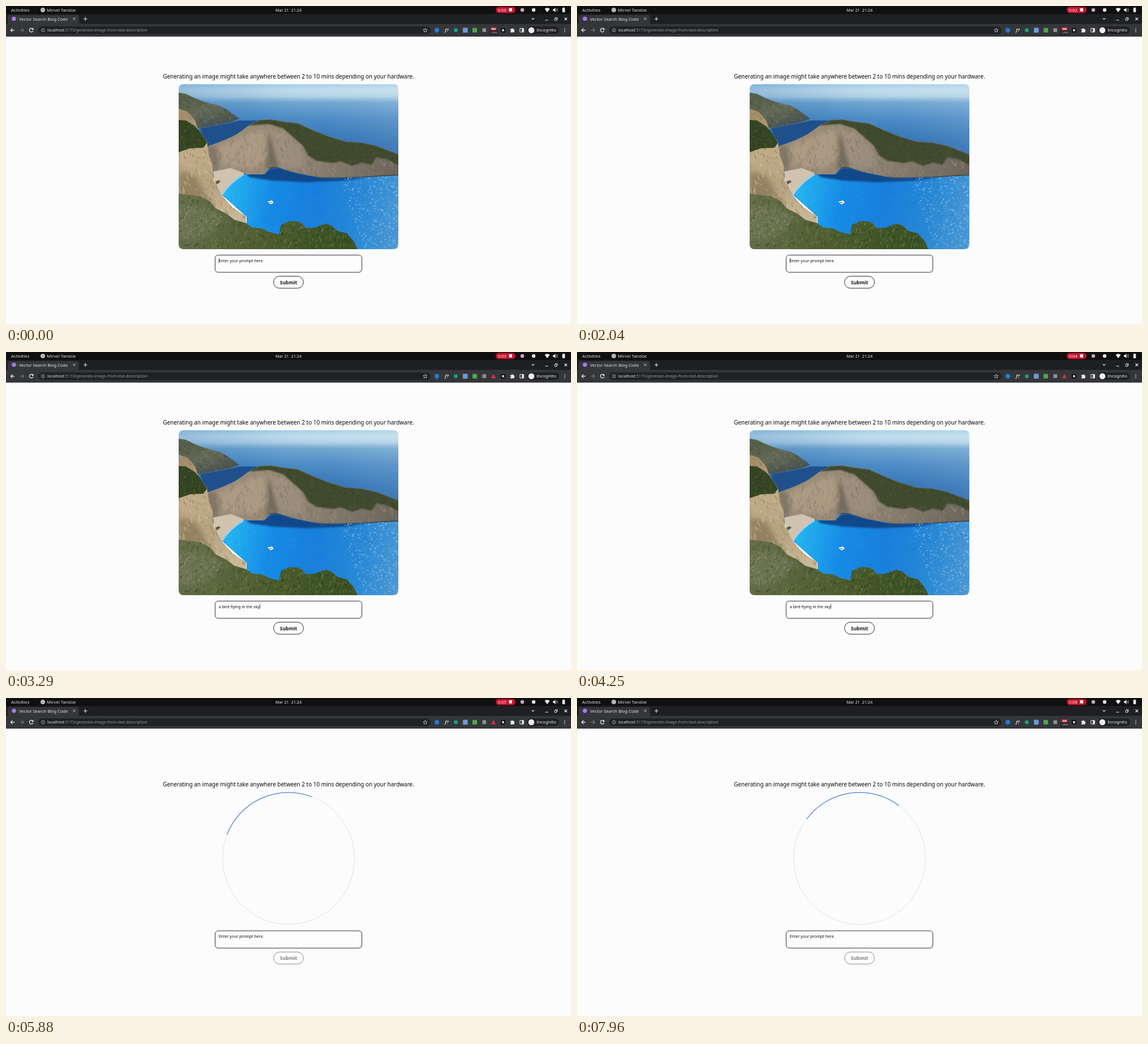
Write an HTML page with a canvas that moves like this. It is 998x561 px and loops after 8 s.

```html
<!DOCTYPE html>
<html lang="en">
<head>
<meta charset="utf-8">
<title>Image generator</title>
<style>
html, body { margin: 0; width: 100%; height: 100%; overflow: hidden; background: #fcfcfd; }
canvas { display: block; width: 998px; height: 561px; }
</style>
</head>
<body>
<canvas id="stage" width="998" height="561"></canvas>
<script>
const W = 998, H = 561, LOOP = 8000;
const TYPE_FROM = 2150, TYPE_STEP = 45, SUBMIT_AT = 4930;
const PROMPT = 'a bird flying in the sky';
const FONT = '"Noto Sans", "Open Sans", sans-serif';
// [time, turned degrees] of the spinner
const SPIN = [[4960, 5], [6790, 662.6], [7960, 1071.3]];

let ctx = document.getElementById('stage').getContext('2d');

function makeLayer(draw) {
  const layer = document.createElement('canvas');
  layer.width = W;
  layer.height = H;
  const main = ctx;
  ctx = layer.getContext('2d');
  draw();
  ctx = main;
  return layer;
}

function text(str, x, midY, size, color, align = 'left', weight = 400) {
  ctx.font = `${weight} ${size}px ${FONT}`;
  ctx.textAlign = align;
  ctx.fillStyle = color;
  ctx.fillText(str, x, midY + size * 0.36);
  return ctx.measureText(str).width;
}

function rect(x, y, w, h, color) {
  ctx.fillStyle = color;
  ctx.fillRect(x, y, w, h);
}

function round(x, y, w, h, r, fill, stroke, line = 1) {
  ctx.beginPath();
  ctx.roundRect(x, y, w, h, r);
  paint(fill, stroke, line);
}

function dot(x, y, r, fill, stroke, line = 1) {
  ctx.beginPath();
  ctx.arc(x, y, r, 0, Math.PI * 2);
  paint(fill, stroke, line);
}

function paint(fill, stroke, line) {
  if (fill) { ctx.fillStyle = fill; ctx.fill(); }
  if (stroke) { ctx.strokeStyle = stroke; ctx.lineWidth = line; ctx.stroke(); }
}

function fill(d, color) {
  ctx.fillStyle = color;
  ctx.fill(new Path2D(d));
}

function stroke(d, color, line = 1) {
  ctx.strokeStyle = color;
  ctx.lineWidth = line;
  ctx.stroke(new Path2D(d));
}

function gradient(x0, y0, x1, y1, ...colors) {
  const g = ctx.createLinearGradient(x0, y0, x1, y1);
  colors.forEach((c, i) => g.addColorStop(i / (colors.length - 1), c));
  return g;
}

function randomizer(seed) {
  return () => (seed = (seed * 16807) % 2147483647) / 2147483647;
}

// Short seeded strokes inside a shape
function texture(d, [x, y, w, h], count, colors, len, slope, seed) {
  const rnd = randomizer(seed);
  ctx.save();
  ctx.clip(new Path2D(d));
  ctx.lineCap = 'round';
  for (let i = 0; i < count; i++) {
    const px = x + rnd() * w, py = y + rnd() * h;
    const a = slope + (rnd() - 0.5) * 1.3, l = len * (0.4 + rnd());
    ctx.beginPath();
    ctx.moveTo(px, py);
    ctx.lineTo(px + Math.cos(a) * l, py + Math.sin(a) * l);
    ctx.strokeStyle = colors[Math.floor(rnd() * colors.length)];
    ctx.lineWidth = 0.7 + rnd() * 1.3;
    ctx.stroke();
  }
  ctx.restore();
}

// A shape with a blurred edge, kept inside another shape
function shade(clip, d, color, blur) {
  ctx.save();
  ctx.clip(new Path2D(clip));
  ctx.filter = `blur(${blur}px)`;
  fill(d, color);
  ctx.restore();
}

function drawPhoto() {
  ctx.beginPath();
  ctx.roundRect(305, 138, 388, 291, 8);
  ctx.clip();

  rect(305, 138, 388, 32, gradient(305, 138, 305, 170, '#a6cfe8', '#c0deec', '#b0d0e5', '#6ea5d0'));
  rect(305, 169, 388, 134, gradient(305, 169, 305, 262, '#6ea5d0', '#4787c2', '#3174b5', '#2563a9'));
  rect(305, 138, 388, 130, gradient(305, 0, 693, 0, '#1e62a840', '#1e62a818', '#ffffff08', '#ffffff20'));

  const cape = 'M305 153L318 155L330 161L345 167L360 172L378 176L392 184L412 199L396 205L345 215L305 215Z';
  fill(cape, gradient(340, 155, 360, 215, '#535e48', '#666a58', '#465351'));
  texture(cape, [305, 150, 110, 66], 240, ['#3c4c3088', '#85806c77', '#50594588'], 4, 0.7, 23);
  fill('M343 216L396 206L412 202L446 202L385 240L355 248Z', '#20508c');

  const cliff = 'M355 248L385 237L408 226L430 210L448 201L468 200L492 204L516 207L540 218L570 230L600 239L628 241L655 247L693 262V298L655 300L600 302L560 303L530 300L497 291L480 284L466 285L456 297L425 297L400 289L368 293L358 270Z';
  fill(cliff, gradient(370, 240, 690, 295, '#9c8d78', '#978976', '#83796b', '#6b655c'));
  shade(cliff, 'M375 250L410 234L445 219L461 224L458 270L440 286L400 283L375 278Z', '#b7a58a99', 4);
  shade(cliff, 'M466 220L500 226L524 255L530 285L500 286L477 272Z', '#a5978588', 4);
  shade(cliff, 'M462 225L468 235L476 265L482 285L460 288L463 260Z', '#5d554b99', 3);
  shade(cliff, 'M357 245L372 248L378 275L370 293L355 290Z', '#6f665899', 4);
  texture(cliff, [355, 200, 338, 104], 650, ['#b5a58d66', '#756c6066', '#9b8c7866', '#6b645a55'], 7, 1.5, 37);

  const woods = 'M428 211L448 201L468 200L492 204L516 207L540 218L570 230L600 239L628 241L655 247L693 262V281L672 270L654 267L646 280L628 276L612 282L592 274L577 277L548 273L534 264L524 246L508 232L490 216L464 208Z';
  shade(cliff, woods, '#3f4a2f', 1.2);
  texture(woods, [428, 200, 265, 88], 650, ['#2b3a2277', '#4f593577', '#38452a77', '#5c614477'], 3, 1, 41);
  stroke('M466 286C477 281 492 292 530 300S645 300 693 298', '#4a4a4a', 2);

  const bay = 'M418 297L456 297L468 287L482 286L500 292L560 304L640 302L693 299V429H425V372L381 333L400 311Z';
  fill(bay, gradient(390, 330, 693, 385, '#25b4f0', '#168be5', '#187fdc', '#2787d4', '#4996d2'));
  texture(bay, [382, 310, 311, 119], 400, ['#2ba0ef33', '#0d70d033', '#39adf033'], 6, -0.1, 53);
  shade(bay, 'M424 296L456 296L468 286L482 285L500 291L560 303L640 302L600 308L530 311L470 308L430 302Z', '#11488a', 1.5);
  const glitter = 'M588 303L693 298V429H633Z';
  texture(glitter, [585, 300, 108, 129], 620, ['#a9d1ed66', '#d2e8f977', '#78b8e666'], 1.2, -0.3, 61);

  fill('M366 292L397 286L421 295L402 309L389 322L382 334L369 318Z', '#d0c4b0');
  stroke('M420 297Q395 312 382 333', '#8fd2ee', 2.2);
  fill('M370 310L376 307L379 310L372 315Z', '#65584b');

  const bluff = 'M305 181L321 187L334 202L340 218L355 240L358 263L365 280L367 308L383 336L400 355L424 371L424 388L395 380L305 350Z';
  fill(bluff, gradient(310, 190, 395, 375, '#a28a67', '#c0ac89', '#b6a27f', '#c8b797'));
  shade(bluff, 'M305 290L335 300L355 335L370 350L340 345L305 335Z', '#857355aa', 5);
  texture(bluff, [305, 180, 120, 205], 430, ['#decda988', '#9a866588', '#80705588', '#c4b18e88'], 6, 1, 71);
  const scrub = 'M305 201L318 202L334 212L343 222L355 241L349 250L325 251L305 258Z';
  fill(scrub, '#354524');
  texture(scrub, [305, 200, 52, 60], 190, ['#23351a99', '#4d602c99', '#3b4e2599'], 4, -1, 83);

  const bush = 'M305 331L323 333L342 335L361 345L370 357L389 366L403 377L424 383L435 391L451 392L466 399L482 403L486 386L502 379L520 381L530 392L545 391L564 384L574 387L586 397L602 401L614 415L621 429H305Z';
  fill(bush, gradient(320, 335, 590, 429, '#666d4b', '#56633a', '#475a2b', '#394f23'));
  texture(bush, [305, 330, 318, 100], 1250, ['#2b3a1f99', '#50662f99', '#6d7d4099', '#3b502499', '#8088607a'], 4, -1.2, 97);
  const pale = 'M305 354L345 350L384 372L370 398L336 413L305 408Z';
  shade(bush, pale, '#7c806366', 5);
  texture(pale, [305, 350, 80, 62], 230, ['#8d917388', '#5f664988', '#9a9b8088'], 3, -1, 103);

  fill('M462 345L470 343L473 347L467 350Z', '#f1efeb');
  rect(465, 346, 4, 1.3, '#c76650');
}

function drawSystemBar() {
  rect(0, 0, W, 14, '#101011');
  text('Activities', 9, 7, 7.8, '#e2e2e2');
  dot(65, 7, 4, '#b7b7b7');
  text('Mirvel Tandoe', 72, 7, 7.8, '#e2e2e2');
  text('Mar 21  21:24', 499, 7, 7.25, '#e8e8e8', 'center');
  round(865, 1.5, 35, 11, 5.5, '#c8102a');
  rect(888.5, 4, 5.5, 5.5, '#fff');
  dot(912, 7, 3.2, '#c9a7bd');
  dot(932, 7, 3.2, '#dedede');
  fill('M951.5 5Q956 1.5 960.5 5L956 11Z', '#efefef');
  fill('M966 5.5H968L970.5 3V11L968 8.5H966Z', '#efefef');
  stroke('M972 5Q973.3 7 972 9M973.3 3.5Q975.5 7 973.3 10.5', '#aaa', 0.8);
  round(982.7, 3.5, 4.6, 7.5, 0.8, '#efefef');
  rect(984, 2.5, 2, 1, '#efefef');
}

function drawTabs() {
  rect(0, 14, W, 18, '#1e1f22');
  round(3, 16, 126, 20, 4, '#34363a');
  dot(14, 22.5, 3.8, '#a478e8');
  text('Vector Search Blog Code', 23, 22.8, 7.5, '#e4e5e7');
  stroke('M118.5 20.5L122.5 24.5M122.5 20.5L118.5 24.5', '#dcdde0');
  stroke('M137 22.8H143.5M140.2 19.5V26', '#e4e5e7', 1.1);
  stroke('M928.8 21.5L931 23.7L933.2 21.5', '#ddd', 1.1);
  stroke('M952.5 25H957.5', '#ddd', 1.1);
  stroke('M969 22H972.5V25.5H969ZM970.5 22V20.5H974V24H972.5', '#ddd', 0.9);
  stroke('M986.5 20.5L991 25M991 20.5L986.5 25', '#eee', 1.1);
}

function drawToolbar() {
  rect(0, 31.5, W, 22.5, '#34363a');
  stroke('M15 42.7H8.5M11.5 39.5L8.3 42.7L11.5 45.9', '#eee', 1.2);
  stroke('M24.5 42.7H31M28 39.5L31.2 42.7L28 45.9', '#777b80', 1.1);
  stroke('M47.2 40.5A3.3 3.3 0 1 0 47.8 43.6M47.9 39.3V41.4H45.7', '#eee', 1.2);
  round(57, 36, 693, 13.5, 6.75, '#202124');
  dot(65.3, 42.7, 3, null, '#b8bbc0', 0.8);
  rect(64.9, 42.2, 0.9, 2.2, '#b8bbc0');
  rect(64.9, 40.8, 0.9, 0.8, '#b8bbc0');
  const w = text('localhost', 73, 42.7, 7.08, '#e3e4e6');
  text(':5173/generate-image-from-text-description', 73 + w, 42.7, 7.08, '#969aa0');
  stroke('M740.5 39L741.5 41.6L744.2 41.8L742.1 43.5L742.8 46.1L740.5 44.7L738.2 46.1L738.9 43.5L736.8 41.8L739.5 41.6Z', '#d6d7da', 0.8);

  dot(761, 42.7, 4.2, '#2479d3');
  text('f?', 778.5, 42.5, 7.8, '#e6e6e6', 'center', 'italic 600');
  dot(794.5, 42.7, 3.4, '#16a37c');
  round(807, 38.5, 8.5, 8.5, 1, '#6f99da');
  round(824, 38.7, 8, 8, 1, '#4ca84a');
  round(841.5, 39.3, 6.6, 6.6, 0, '#8d9298');
  round(874, 38.7, 8, 8, 1, '#111');
  round(876.3, 40.8, 3.4, 3.8, 0, '#ddd');
  fill('M890.8 40.5H893A1.4 1.4 0 0 1 895.7 40.5H897.4V42.4A1.4 1.4 0 0 1 897.4 45V46.5H890.8V44.8A1.3 1.3 0 0 0 890.8 42.2Z', '#eee');
  round(907.8, 39.5, 6.5, 6.5, 0.5, null, '#eee');
  rect(911.4, 39.5, 2.9, 6.5, '#eee');
  round(920.5, 36, 56.5, 13.5, 6.75, '#202124');
  dot(928, 42.7, 5.3, '#eee');
  text('Incognito', 937.2, 42.7, 7.7, '#eee');
  for (const y of [40, 42.7, 45.4]) dot(987, y, 0.8, '#eee');
}

function drawBrowser() {
  rect(0, 0, W, H, '#fcfcfd');
  drawSystemBar();
  drawTabs();
  drawToolbar();
}

function drawBadge(t) {
  if (t >= 2500 && t < 7500) {
    fill('M861 38.5L865.3 46.5H856.7Z', '#d42f42');
    return;
  }
  rect(856.5, 37.8, 9.5, 5.7, '#d32c3c');
  text('INR', 861.2, 40.7, 4, '#fff', 'center', 700);
  round(854, 43.5, 14.5, 7, 1, '#111');
  text('1200', 861.2, 47, 5.6, '#fff', 'center');
}

function drawForm(t, loading) {
  const shift = loading ? -28.6 : 0;
  const top = 439.4 + shift;
  round(369.4, top, 259.2, 30.4, 5.2, '#fdfdfe', '#303034', 1);
  stroke(`M624 ${top + 28.8}L627.2 ${top + 25.6}M626 ${top + 29}L627.4 ${top + 27.6}`, '#777', 0.6);

  const typed = loading ? '' : PROMPT.slice(0, Math.max(0, Math.floor((t - TYPE_FROM) / TYPE_STEP)));
  const width = text(typed || 'Enter your prompt here.', 375.7, 449 + shift, 7, '#111113');
  const typing = t > TYPE_FROM && t < TYPE_FROM + PROMPT.length * TYPE_STEP;
  if (!loading && (typing || (t + 50) % 1000 < 500)) {
    rect(typed ? 375.9 + width : 375.8, 444.8, 0.8, 8, '#111');
  }

  const fade = Math.min(1, Math.max(0, (t - SUBMIT_AT) / 250));
  const mix = (a, b) => Math.round(a + (b - a) * fade);
  const border = loading ? `rgb(${mix(190, 136)},${mix(188, 134)},${mix(226, 154)})` : '#2a2a2e';
  round(472.6, 476.7 + shift, 52.8, 21.2, 10.6, '#fdfdfe', border, 1);
  text('Submit', 499, 487.6 + shift, 8.6, loading ? '#808082' : '#161618', 'center', 600);
}

function spinAngle(t) {
  const [a, b] = t < SPIN[1][0] ? [SPIN[0], SPIN[1]] : [SPIN[1], SPIN[2]];
  return a[1] + (b[1] - a[1]) * (t - a[0]) / (b[0] - a[0]);
}

function drawSpinner(t) {
  dot(499, 283, 116.4, null, '#e3e3e5', 1);
  const mid = (spinAngle(t) - 90) * Math.PI / 180;
  ctx.beginPath();
  ctx.arc(499, 283, 116.4, mid - Math.PI / 4, mid + Math.PI / 4);
  paint(null, '#4a88dc', 1.3);
}

const browser = makeLayer(drawBrowser);
const photo = makeLayer(drawPhoto);

function draw(t) {
  const loading = t >= SUBMIT_AT;
  ctx.drawImage(browser, 0, 0);
  text('0:0' + Math.floor((t + 100) / 1000), 868.8, 7, 7.5, '#fff');
  drawBadge(t);
  text('Generating an image might take anywhere between 2 to 10 mins depending on your hardware.',
    499, loading ? 152.8 : 124.2, 9.94, '#08080a', 'center');
  if (loading) drawSpinner(t);
  else ctx.drawImage(photo, 0, 0);
  drawForm(t, loading);
}

const start = performance.now();
function tick() {
  draw((performance.now() - start) % LOOP);
  requestAnimationFrame(tick);
}
tick();
</script>
</body>
</html>
```
